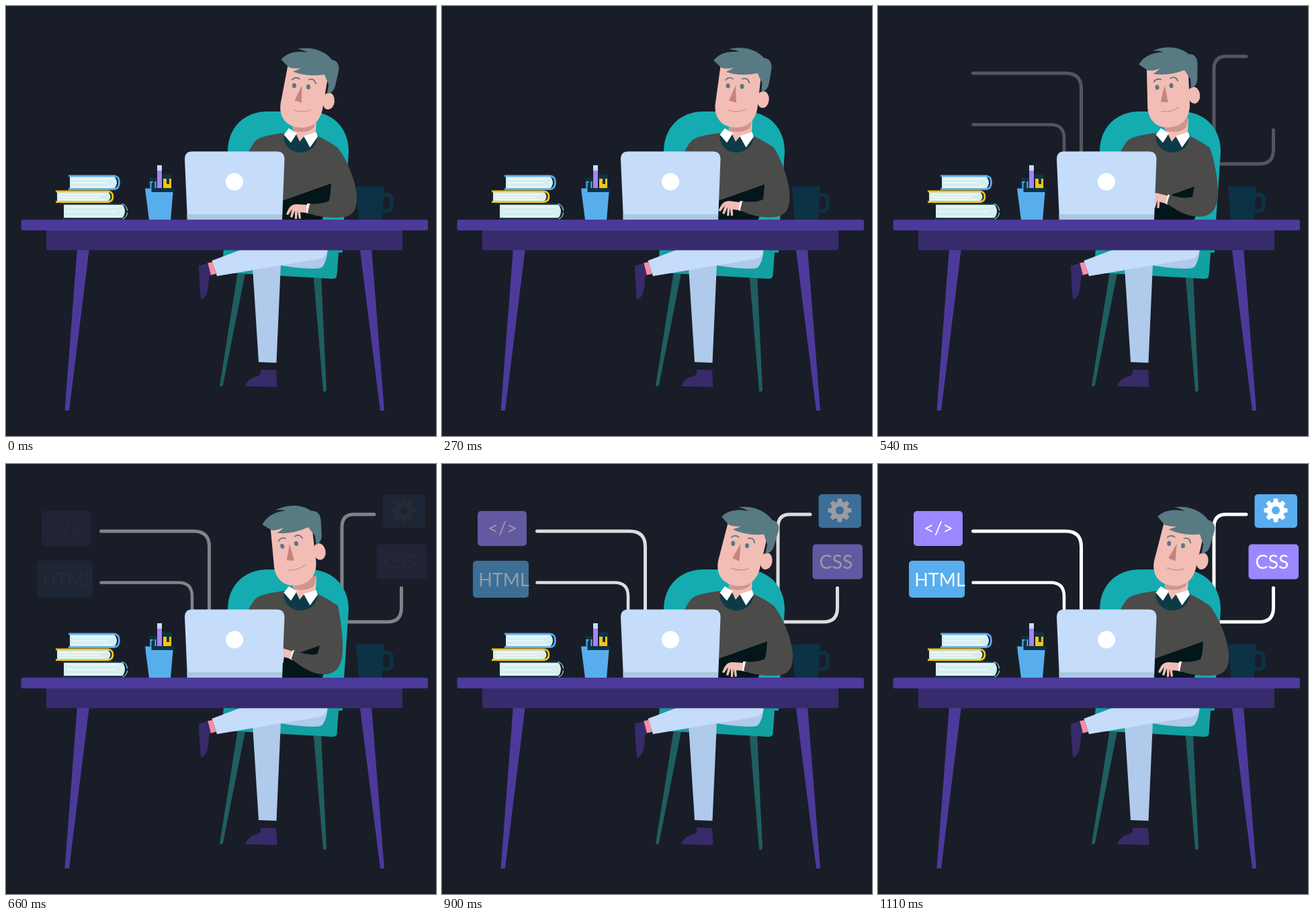
These frames come from a looping animation (640x640 px, 2.31 s). An HTML page with a canvas:

```html
<!DOCTYPE html>
<html lang="en">
<head>
<meta charset="utf-8">
<title>Developer at a desk</title>
<style>
  html, body { margin: 0; width: 100%; height: 100%; overflow: hidden; background: #191d28; }
  canvas { display: block; width: 100vw; height: 100vh; }
</style>
</head>
<body>
<canvas id="stage" width="640" height="640"></canvas>
<script>
const ctx = document.getElementById('stage').getContext('2d');
const LOOP = 2310, STEP = 30;

const BG = [25, 29, 40], WHITE = [255, 255, 255];
const BLUE = [88, 173, 238], PURPLE = [155, 135, 255];
const C = {
  teal: '#14acb0', seat: '#12a0a1', chairLeg: '#1f5e5f',
  sweater: '#4b4b4a', shade: '#03161a', shirt: '#0e3a47',
  skin: '#f2bdb5', skinShade: '#cf958c', nose: '#c58479', hair: '#577a83', mouth: '#d98983',
  jeans: '#c5dcfb', jeansShade: '#afcaea', shoe: '#382b6a', sock: '#f78fa0',
  desk: '#4c3a9b', apron: '#382b6b', navy: '#0d3246', page: '#d5eef0',
  sky: '#58aeec', yellow: '#f8c412', violet: '#a384f5'
};

const clamp = v => Math.min(1, Math.max(0, v));
const lerp = (a, b, k) => a + (b - a) * k;
const mix = (a, b, k) => `rgb(${a.map((v, i) => Math.round(lerp(v, b[i], k)))})`;

// Linear value at time t along [time, value] keys.
function track(keys, t) {
  let [t0, v0] = keys[0];
  for (const [t1, v1] of keys) {
    if (t < t1) return lerp(v0, v1, (t - t0) / (t1 - t0));
    [t0, v0] = [t1, v1];
  }
  return v0;
}

function fill(color, d) {
  ctx.fillStyle = color;
  ctx.fill(new Path2D(d));
}

function stroke(color, width, d, cap = 'round') {
  ctx.strokeStyle = color;
  ctx.lineWidth = width;
  ctx.lineCap = cap;
  ctx.stroke(new Path2D(d));
}

function box(color, x, y, w, h, r = 0) {
  ctx.fillStyle = color;
  ctx.beginPath();
  ctx.roundRect(x, y, w, h, r);
  ctx.fill();
}

function oval(color, x, y, rx, ry = rx, turn = 0) {
  ctx.fillStyle = color;
  ctx.beginPath();
  ctx.ellipse(x, y, rx, ry, turn, 0, Math.PI * 2);
  ctx.fill();
}

function drawLinks(alpha) {
  if (!alpha) return;
  const color = mix(BG, WHITE, alpha);
  stroke(color, 5, 'M141.500 100H279Q302.500 100 302.500 123V220');
  stroke(color, 4.6, 'M141.500 176.500H257Q277 176.500 277 197V220');
  stroke(color, 5, 'M548 75H518Q500 75 500 94V200');
  stroke(color, 5, 'M588.500 184.500V214Q588.500 235 568 235H500');
}

function drawTag(color, x, y, w, h, alpha) {
  box(mix(BG, color, alpha), x, y, w, h, 5);
}

function drawLabel(text, x, y, size, alpha) {
  ctx.fillStyle = mix(BG, WHITE, alpha);
  ctx.font = `${size}px Lato, sans-serif`;
  ctx.textAlign = 'center';
  ctx.fillText(text, x, y);
}

function drawGear(x, y, alpha) {
  const white = mix(BG, WHITE, alpha);
  ctx.save();
  ctx.translate(x, y);
  oval(white, 0, 0, 13);
  for (let i = 0; i < 8; i++) {
    fill(white, 'M-3.800 -11L-3 -17.500H3L3.800 -11Z');
    ctx.rotate(Math.PI / 4);
  }
  oval(mix(BG, BLUE, alpha), 0, 0, 6);
  ctx.restore();
}

function drawTags(alpha) {
  if (!alpha) return;
  drawTag(PURPLE, 53, 70, 73, 52, alpha);
  drawLabel('</>', 90, 105, 27.5, alpha);
  drawTag(BLUE, 46, 144, 83, 55, alpha);
  drawLabel('HTML', 92, 181.5, 27, alpha);
  drawTag(BLUE, 560.5, 45, 63.5, 50, alpha);
  drawGear(592, 69, alpha);
  drawTag(PURPLE, 551.5, 119.5, 74.5, 52, alpha);
  drawLabel('CSS', 586.5, 156, 28.5, alpha);
}

function drawChair() {
  fill(C.chairLeg, 'M345 395H356.500L323 564Q321 567.500 318 565Z');
  fill(C.chairLeg, 'M457.500 400H469L477 572Q475 576 472 573Z');
  fill(C.teal, 'M330 320V217C330 181 354 157 390 157H450C486 157 510 181 510 217L503 320Z');
  fill(C.seat, 'M324 360H501V367H495L492.500 401Q492 406 486 406L328 397Q321 396 322 388Z');
}

function drawLegs() {
  fill(C.jeansShade, 'M367 388L409 384L402.500 531L376 530Z');
  fill(C.jeansShade, 'M400 384L479 360C478 374 475 384 470 389C464 393 432 390 409 386Z');
  fill(C.jeans, 'M349 363H478.500C477 371 474 375 464 377L314 402L306.500 379Z');
  fill(C.sock, 'M300 382.500L307.500 381L313 398.500L303 401Z');
  fill(C.shoe, 'M287 386.500L300.500 383L305 400.500Q302 401 302 405C301 425 299 434 290 437Q287.500 412 287 386.500Z');
  fill(C.shoe, 'M379 541L402 542L403.500 567L357 566C356 560 365 553 374 551Q380 550 379 541Z');
}

function drawMug() {
  fill(C.navy, 'M521 268.500H563L559.500 319H525Z');
  stroke(C.navy, 5.5, 'M561 281H567Q574 281 574 288V298Q574 305 567 305H559', 'butt');
}

function drawTorso() {
  fill(C.shade, 'M408 290L487 262L481 290L470 320H408Z');
  fill(C.sweater, 'M414 189C396 191 381 194 373 199C367 205 364 211 360 219V300H408L411 290L490 262L494 211Q480 201 463 193Z');
  fill(C.shirt, 'M413 193C414 209 425 218 438 218C452 218 463 209 464 193L438 186Z');
  fill(C.skin, 'M428 172L462 168L461 188L443.500 194L437 202L431.500 190L427 184Z');
  fill(C.skinShade, 'M428 172L462 166L458.500 181Q452 187 440 187.500L428 186Z');
  fill('#fff', 'M421 182L413.500 191.500L424 203.500L433 189.500Z');
  fill('#fff', 'M461.500 187.500L464 194.500L452.500 210.500L443 193.500Z');
}

// Sleeve outline with the arm out and with the arm drawn in.
const ARM_OUT = [
  510, 232, 524, 270, 522, 290, 521, 312, 508, 315, 490, 315,
  472, 315, 460, 312, 449, 308, 452, 294.5, 465, 295, 477, 293, 482, 289, 484, 264];
const ARM_IN = [
  498, 230, 502, 258, 501, 280, 499, 306, 488, 314, 470, 313,
  452, 311, 440, 302, 424.500, 290, 429, 277, 441, 282, 456, 286, 464, 282, 467, 270];

function drawArm(k) {
  const p = ARM_OUT.map((v, i) => lerp(v, ARM_IN[i], k));
  const at = i => `${p[i]} ${p[i + 1]} `;
  const curve = i => 'C' + at(i) + at(i + 2) + at(i + 4);

  ctx.save();
  ctx.translate(lerp(450, 427, k), lerp(301, 284, k));
  ctx.rotate(k * 0.24);
  fill(C.skin, 'M-1 -5L-17 -6C-26 -6 -29 -1 -33 9L-30 10L-24 1L-27 13L-24 14L-20 3L-20 16L-17 16L-16 4L-14 16L-11 15L-12 6L-1 7Z');
  fill('#fff', 'M-2 -7L3 -7L1 8L-3 7Z');
  ctx.restore();

  fill(C.sweater, 'M470 202L494 211' + curve(0) + curve(6) + curve(12) +
    'L' + at(18) + curve(20) + 'L' + at(26) + 'L470 245Z');
}

function drawHead(degrees) {
  ctx.save();
  ctx.translate(434, 183);
  ctx.rotate(degrees * Math.PI / 180);
  ctx.translate(-434, -183);
  oval(C.skin, 480, 141.5, 9, 12.5, 0.1);
  fill(C.skin, 'M420 86L408.500 146C406 168 420 181 440 181C456 181 467 172 471 154L480 100L440 82Z');
  fill(C.hair, 'M409.500 79.500C418 70 431 66 449 69Q442 65 433.500 64C454 60 474 66 485 80C493 81 497 88 495 97L490 119Q488 128 478 131L480 117L474 102Q448 106 427 97.500Q433 96 439 92Q430 94 421 91.500Z');
  fill(C.nose, 'M440.500 118L440 144L429.500 140.500Z');
  oval(C.hair, 429, 118.500, 3, 3.700);
  oval(C.hair, 450, 120.500, 3, 3.700);
  stroke(C.hair, 1.8, 'M426 109.500Q431 104.500 437 108.500');
  stroke(C.hair, 1.8, 'M451 109.500Q459 107 461 115.500');
  stroke(C.mouth, 1.2, 'M428 155Q442 160 454 154.500');
  ctx.restore();
}

function drawBook(cover, x, y, right, bottom) {
  const mid = (y + bottom) / 2;
  fill(C.page, `M${x + 2} ${y + 2}H${right - 9}Q${right - 1} ${mid} ${right - 9} ${bottom - 2}H${x + 2}Z`);
  for (let i = 0; i < 3; i++) {
    const ly = lerp(y + 6, bottom - 5, i / 2);
    stroke('#fff', 1.1, `M${x + 6} ${ly}H${right - 13 - i % 2 * 7}`);
  }
  const edge = right - 1.5;
  stroke(cover, 2.8, `M${x} ${y + 1.4}H${right - 9}Q${edge} ${y + 2} ${edge} ${mid}Q${edge} ${bottom - 2} ${right - 9} ${bottom - 1.4}H${x}`, 'butt');
}

function drawBooks() {
  drawBook(C.navy, 84, 293, 182, 318);
  drawBook(C.yellow, 74, 274.5, 160.5, 293);
  drawBook(C.sky, 93, 251.5, 170, 274);
  stroke('#d5eef0', 1, 'M173 294.500Q180 297 180.500 304M180.500 308Q180 314 174 317');
}

function drawPens() {
  box(C.navy, 213, 256, 11, 16);
  stroke(C.sky, 2, 'M215.500 271V262H218.500M222.500 261V271', 'butt');
  box(C.violet, 225, 237, 7, 35);
  box('#b9e6f3', 225, 237, 7, 5);
  box('#d9ccff', 225, 242, 7, 3);
  box(C.navy, 233, 250.500, 14, 7);
  box(C.yellow, 234, 257, 12, 15);
  fill(C.navy, 'M239 257H243V265H239Z');
  fill(C.sky, 'M207 271.500H249L245 319H213Z');
  box(C.navy, 216.500, 271, 34, 6);
}

function drawLaptop() {
  fill(C.jeans, 'M266 228Q266 216.500 277 216.500H403Q414.500 216.500 414.500 228L411 319H270Z');
  box('#aac8e2', 269.500, 310, 141.500, 9);
  oval('#fff', 340, 261.500, 13);
}

function drawDesk() {
  fill(C.desk, 'M106 360H124L94 602H87.500Z');
  fill(C.desk, 'M526.500 360H544L563 602H557Z');
  box(C.apron, 60, 332, 530, 31.500, 2);
  box(C.desk, 22.500, 318, 605.500, 16, 3);
}

const HEAD_KEYS = [[0, 0], [180, 0], [660, -16.2], [900, 3.7]];
const ARM_KEYS = [[0, 0], [180, 0], [270, 0.22], [420, 0.55], [660, 1], [900, 0]];

function draw(t) {
  ctx.fillStyle = mix(BG, BG, 0);
  ctx.fillRect(0, 0, 640, 640);
  drawLinks(clamp((t - 390) / 600));
  drawTags(clamp((t - 630) / 480));
  drawChair();
  drawLegs();
  drawMug();
  drawTorso();
  drawArm(track(ARM_KEYS, t));
  drawHead(track(HEAD_KEYS, t));
  drawBooks();
  drawPens();
  drawLaptop();
  drawDesk();
}

const start = performance.now();
function tick() {
  const t = (performance.now() - start) % LOOP;
  draw(Math.floor(t / STEP) * STEP);
  requestAnimationFrame(tick);
}
tick();
</script>
</body>
</html>
```
